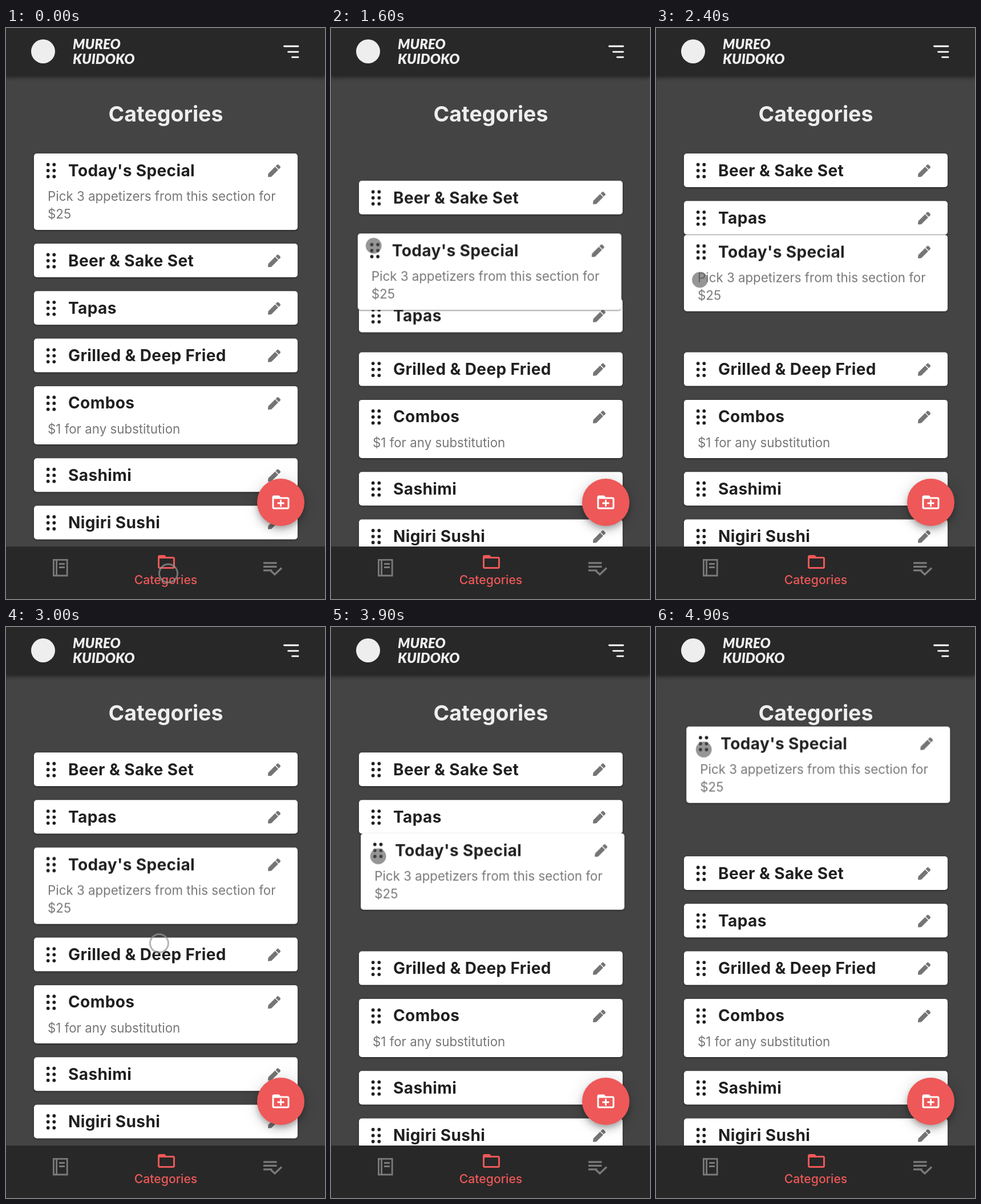
An HTML page that plays this animation: 559 by 1001 pixels, repeating every 5000 ms.

```html
<!DOCTYPE html>
<html lang="en">
<head>
<meta charset="utf-8">
<title>Menu categories</title>
<style>
  html, body { margin: 0; width: 100%; height: 100%; overflow: hidden; background: #444; }
  #stage { position: relative; width: 559px; height: 1001px; overflow: hidden; background: #444; }
  #stage > * { position: absolute; left: 0; top: 0; }
  svg { display: block; overflow: visible; }
  text { font-family: Inter, "Open Sans", sans-serif; }
  .heading { font-size: 37.5px; font-weight: 700; fill: #eee; text-anchor: middle; }
  .card {
    position: absolute; width: 462px; background: #fff; border-radius: 5px; will-change: transform;
    box-shadow: 0 2px 2px -1px rgba(0,0,0,.3), 0 1px 2px rgba(0,0,0,.22), 0 1px 5px rgba(0,0,0,.16);
  }
  .name { font-size: 28px; font-weight: 700; letter-spacing: .4px; fill: #202020; }
  .note { font-size: 22.3px; fill: #777; }
  header {
    width: 559px; height: 84px; background: #282828;
    box-shadow: 0 3px 6px rgba(0,0,0,.35), 0 1px 10px rgba(0,0,0,.2);
  }
  .brand { font: italic 900 24px Lato, sans-serif; fill: #eee; }
  #edge { width: 1px; height: 1001px; background: #333; }
  nav { margin-top: 909px; width: 559px; height: 92px; background: #282828; }
  .tab { font-size: 21.2px; font-weight: 500; fill: #ee5858; text-anchor: middle; }
  #fab {
    margin: 790px 0 0 440px; width: 83px; height: 83px; border-radius: 50%; background: #ee5858;
    box-shadow: 0 5px 8px -1px rgba(0,0,0,.2), 0 9px 16px rgba(0,0,0,.14), 0 2px 28px rgba(0,0,0,.15);
  }
  #cursor { fill: none; stroke: rgba(150,150,150,.7); stroke-width: 3; }
  #cursor.pressed { fill: rgba(80,80,80,.6); stroke: rgba(150,150,150,.5); stroke-width: 1.5; }
</style>
</head>
<body>
<div id="stage">
  <svg width="559" height="1001">
    <defs>
      <path id="pencil" d="M290.7 93.2l128 128-278 278-114.1 12.6c-15.3 1.7-28.2-11.2-26.5-26.5l12.7-114.2zM497.9 74.2l-60.1-60.1c-18.7-18.8-49.1-18.8-67.9 0l-56.5 56.5 128 128 56.5-56.5c18.8-18.7 18.8-49.1 0-67.9z"/>
      <path id="folder" fill-rule="evenodd" d="M20 6h-8l-2-2H4c-1.1 0-2 .9-2 2v12c0 1.1.9 2 2 2h16c1.1 0 2-.9 2-2V8c0-1.1-.9-2-2-2zM4 8h16v10H4z"/>
      <path id="grip" d="M24.7 19.5h0M35.3 19.5h0M24.7 30h0M35.3 30h0M24.7 40.5h0M35.3 40.5h0"
        stroke="#202020" stroke-width="5.8" stroke-linecap="round"/>
    </defs>
    <text class="heading" x="280" y="164">Categories</text>
  </svg>
  <div id="edge"></div>
  <div id="list"></div>
  <header>
    <svg width="559" height="84">
      <circle cx="65" cy="41" r="21" fill="#eee"/>
      <text class="brand" x="117" y="37">MUREO</text>
      <text class="brand" x="117" y="63">KUIDOKO</text>
      <path d="M487.5 32H512M494.5 41.8H512M501.5 51.2H512" stroke="#fff" stroke-width="2.8" stroke-linecap="round"/>
    </svg>
  </header>
  <div id="fab">
    <svg width="83" height="83" fill="#fff">
      <g transform="translate(23.5 23.5) scale(1.5)">
        <use href="#folder"/>
        <path d="M8 13h8M12 9v8" stroke="#fff" stroke-width="1.9"/>
      </g>
    </svg>
  </div>
  <nav>
    <svg width="559" height="92" viewBox="0 909 559 92" fill="none" stroke="#7a7a7a" stroke-width="2.8">
      <path d="M83.4 932.4H107.2V960H83.4ZM88.6 932V960M93 939.5H103M93 945.5H103"/>
      <path d="M451 937.8H474.5M451 944.3H474.5M451 950.8H466.5M464.5 952L471 958L483 946.5" stroke-width="3.3"/>
      <use href="#folder" transform="translate(263 918) scale(1.5)" fill="#ee5858" stroke="none"/>
      <text class="tab" x="280" y="975" stroke="none">Categories</text>
    </svg>
  </nav>
  <svg width="559" height="1001"><circle id="cursor"/></svg>
</div>
<script>
const LEFT = 49, TOP = 220, GAP = 24, ROW = 59.3, LOOP = 5000, STEP = 100;
const SLOT = 158, DRAG_SLOT = SLOT + GAP;
const GRAB = 1400, DROP = 2100, SETTLE = 2500, REGRAB = 3700;
const list = document.getElementById('list');
const cursor = document.getElementById('cursor');

function addCard(name, height, ...notes) {
  const el = document.createElement('div');
  el.className = 'card';
  el.style.height = height + 'px';
  const lines = notes.map((s, i) => `<text class="note" x="24" y="${83 + 31 * i}">${s}</text>`).join('');
  el.innerHTML = `<svg width="462" height="${height}"><use href="#grip"/>
    <text class="name" x="60" y="39.5">${name}</text>${lines}
    <use href="#pencil" transform="translate(410 19.2) scale(.043)" fill="#757575"/></svg>`;
  list.append(el);
  return { el, height };
}

const others = [
  addCard('Beer &amp; Sake Set', ROW),
  addCard('Tapas', ROW),
  addCard('Grilled &amp; Deep Fried', ROW),
  addCard('Combos', 102.3, '$1 for any substitution'),
  addCard('Sashimi', ROW),
  addCard('Nigiri Sushi', ROW)
];
const special = addCard("Today's Special", SLOT - GAP, 'Pick 3 appetizers from this section for', '$25');

others.reduce((y, c) => (c.base = y) + c.height + GAP, TOP);
const thirdSlot = others[2].base;

// Pointer moves, each eased from where the last one ended
const home = { x: 284.5, y: 956 };
const moves = [
  { from: 0, to: 500, x: 84, y: 273 },
  { from: 600, to: 1000, x: 77, y: 241.5 },
  { from: 1300, to: 1800, x: 74, y: 430 },
  { from: 1800, to: 2400, x: 77, y: 441.5 },
  { from: 2400, to: 2600, x: 272, y: 557 },
  { from: 2900, to: 3500, x: 79.5, y: 427.3 },
  { from: 3600, to: 4400, x: 94.5, y: 307.3 },
  { from: 4500, to: 4900, x: 83.7, y: 214.8 }
];

const clamp = v => Math.max(0, Math.min(1, v));
const easeOut = p => 1 - (1 - clamp(p)) ** 3;
const easeInOut = p => p < .5 ? 4 * clamp(p) ** 3 : 1 - 4 * (1 - clamp(p)) ** 3;
const mix = (a, b, p) => a + (b - a) * p;
const place = (el, x, y) => { el.style.transform = `translate(${x}px,${y}px)`; };

function pointer(t) {
  return moves.reduce((at, m) => {
    const p = easeInOut((t - m.from) / (m.to - m.from));
    return { x: mix(at.x, m.x, p), y: mix(at.y, m.y, p) };
  }, home);
}

function specialPos(t) {
  if (t < GRAB) return [LEFT, TOP];
  if (t < SETTLE) {
    const { x, y } = pointer(Math.min(t, DROP));
    const p = easeOut((t - DROP) / 300);
    return [mix(x - 28, LEFT, p), mix(y - 21.5, thirdSlot - GAP, p)];
  }
  if (t < REGRAB) return [LEFT, thirdSlot];
  const { x, y } = pointer(t);
  return [x - 30.5, y - 40.3];
}

// Room left above a card for the special: closes at `up`, reopens at `down`
function shift(t, up = LOOP, down = LOOP) {
  const dragging = (t >= GRAB && t < SETTLE) || t >= REGRAB;
  const open = 1 - easeOut((t - up) / 250) + easeOut((t - down) / 250);
  return open * (dragging ? DRAG_SLOT : SLOT);
}

// When the special passes the first two cards, down and back up
const swaps = [[1510, 4640], [1595, 3990]];

function draw(t) {
  others.forEach((c, i) => place(c.el, LEFT, c.base + shift(t, ...(swaps[i] || []))));
  place(special.el, ...specialPos(t));
  const { x, y } = pointer(t);
  const pressed = (t >= 1000 && t < SETTLE) || t >= 3600;
  cursor.setAttribute('cx', x);
  cursor.setAttribute('cy', y);
  cursor.setAttribute('r', pressed ? 13.5 : 16);
  cursor.setAttribute('class', pressed ? 'pressed' : '');
}

const start = performance.now();
function tick() {
  const t = (performance.now() - start) % LOOP;
  draw(Math.floor(t / STEP) * STEP);
  requestAnimationFrame(tick);
}
tick();
</script>
</body>
</html>
```
